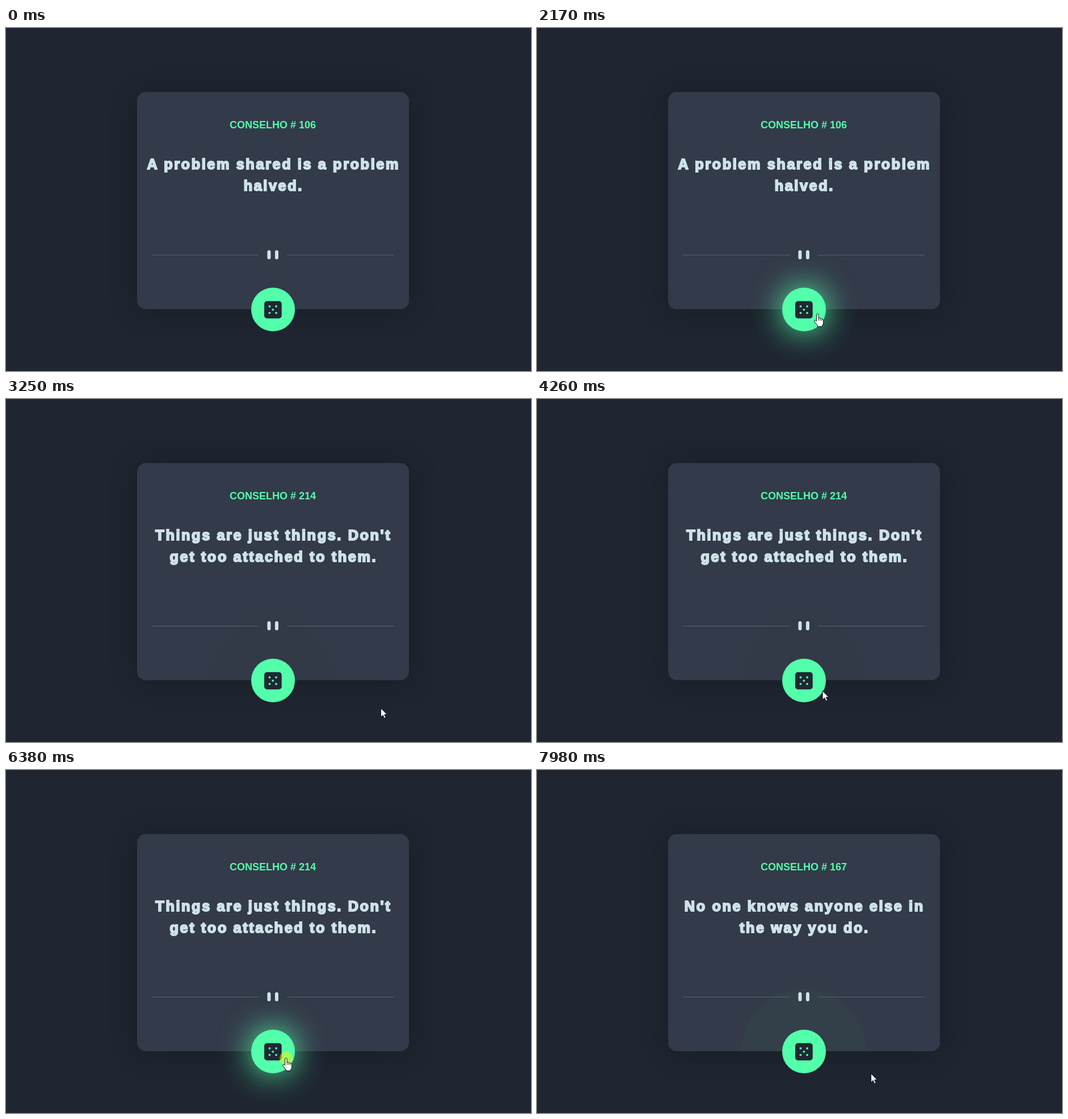
Animation, 925 px wide and 605 px high, one loop 8000 ms. Source, as an HTML page:

```html
<!DOCTYPE html>
<html lang="en">
<head>
<meta charset="utf-8">
<title>Advice card</title>
<style>
  html, body { margin: 0; width: 100%; height: 100%; overflow: hidden; background: #1f2631; }
  div, svg { position: absolute; }
  svg { left: 0; top: 0; }
  #card { left: 231px; top: 113px; width: 478.5px; height: 383px; border-radius: 15px;
    background: #333a49; box-shadow: 0 3px 50px rgba(0, 0, 0, .25); }
  #button { left: 432px; top: 458px; width: 76.5px; height: 76.5px; border-radius: 50%;
    background: #53ffaa; }
  text { font-family: "Liberation Sans", Arial, sans-serif; font-weight: bold; text-anchor: middle; }
  #title { font-size: 18px; fill: #53ffaa; }
  .advice { font-size: 25.2px; letter-spacing: 2.65px; fill: #cee3e9;
    stroke: #cee3e9; stroke-width: 2.1px; }
</style>
</head>
<body>
<div id="card"></div>
<svg width="925" height="605">
  <text id="title" x="470" y="177"></text>
  <text class="advice" x="471.3" y="249"></text>
  <text class="advice" x="471.3" y="287"></text>
  <path id="halo" d="M360 496A110 110 0 0 1 580 496Z"/>
  <path d="M257.5 400.5H445.5M495 400.5H683" stroke="#4f6872"/>
  <path d="M463.4 395V405M476.9 395V405" stroke="#cee3e9" stroke-width="6" stroke-linecap="round"/>
</svg>
<div id="button"></div>
<svg width="925" height="605">
  <rect x="455" y="481.7" width="30.7" height="30.5" rx="5" fill="#202733"/>
  <g id="pips" fill="#53ffaa"></g>
  <g id="cursor" stroke-linejoin="round">
    <circle id="click" r="11.5" fill="#ffee00" fill-opacity=".5"/>
    <path id="arrow" d="M.5 .5V16l3.6-3.4 2.4 5.6 2.6-1.1-2.4-5.5H11.5Z" fill="#fff" stroke="#10141b"/>
    <g id="hand" stroke="#10141b">
      <path fill="#fff" d="M-2 12.6V1.5a1.8 1.8 0 0 1 3.6 0V7q2.6-1 3 .8 2.4-.7 2.8 1 2.5-.4 2.6 1.8V15q0 3-2 5.5V22H0V20.5L-5.5 13.5q-1-2.5 1-2.7 1.3 0 2.5 1.8Z"/>
      <path fill="none" d="M1.6 7v4.5M4.6 8v3.5M7.4 9v3"/>
    </g>
  </g>
</svg>
<script>
const LOOP = 8000, FADE = 270, FLASH = 70;
const $ = id => document.getElementById(id);
const lines = document.querySelectorAll('.advice');

const quotes = [
  { at: 0, number: 106, text: ['A problem shared is a problem', 'halved.'] },
  { at: 2770, number: 214, text: ["Things are just things. Don't", 'get too attached to them.'] },
  { at: 6710, number: 167, text: ['No one knows anyone else in', 'the way you do.'] },
];

// Times at which the pointer enters, presses and leaves the button
const visits = [
  { enter: 1100, press: 2100, leave: 2840 },
  { enter: 4830, press: 6380, leave: 6990 },
];

const start = { x: 785, y: 600 };
const moves = [
  { from: 260, to: 1370, x: 494.5, y: 504.5 },
  { from: 2770, to: 3250, x: 660, y: 545 },
  { from: 3910, to: 4260, x: 503, y: 515 },
  { from: 4260, to: 4680, x: 433, y: 402 },
  { from: 4750, to: 5100, x: 493.5, y: 508.5 },
  { from: 6970, to: 7250, x: 624, y: 539 },
  { from: 7970, to: 7980, x: 588, y: 535 },
];

const progress = (t, from, to) => Math.min(1, Math.max(0, (t - from) / (to - from)));
const easeOut = u => 1 - (1 - u) ** 2.5;
const ramp = (t, from) => progress(t, from, from + FADE);
const within = (t, from, to) => t >= from && t < to;
const show = (id, visible) => $(id).style.display = visible ? '' : 'none';

function pointer(t) {
  return moves.reduce((p, m) => {
    const u = easeOut(progress(t, m.from, m.to));
    return { x: p.x + (m.x - p.x) * u, y: p.y + (m.y - p.y) * u };
  }, start);
}

function setText(el, value) {
  if (el.textContent !== value) el.textContent = value;
}

function draw() {
  const t = performance.now() % LOOP;

  const quote = quotes.findLast(q => q.at <= t);
  setText($('title'), `CONSELHO # ${quote.number}`);
  quote.text.forEach((text, i) => setText(lines[i], text));

  const glow = visits.reduce((sum, v) => sum + ramp(t, v.enter) - ramp(t, v.leave), 0);
  $('button').style.boxShadow = `0 0 ${56 * glow}px rgba(83, 255, 170, ${glow})`;

  // Faint disc left on the card once the glow has gone
  show('halo', !glow && t > visits[0].leave);
  $('halo').setAttribute('fill', t > visits[1].leave ? 'rgba(50, 90, 70, .14)' : 'rgba(30, 35, 45, .04)');

  const { x, y } = pointer(t);
  const pointing = visits.some(v => within(t, v.enter, v.leave));
  $('cursor').setAttribute('transform', `translate(${x} ${y})`);
  show('cursor', t >= moves[0].from);
  show('hand', pointing);
  show('arrow', !pointing);
  show('click', visits.some(v => within(t, v.press, v.press + FLASH)));

  requestAnimationFrame(draw);
}

// Five pips: the centre and four corners
$('pips').innerHTML = [[0, 0], [-1, -1], [1, -1], [-1, 1], [1, 1]]
  .map(([i, j]) => `<circle cx="${470.2 + 5.8 * i}" cy="${496.8 + 5.8 * j}" r="1.9"/>`).join('');
draw();
</script>
</body>
</html>
```
